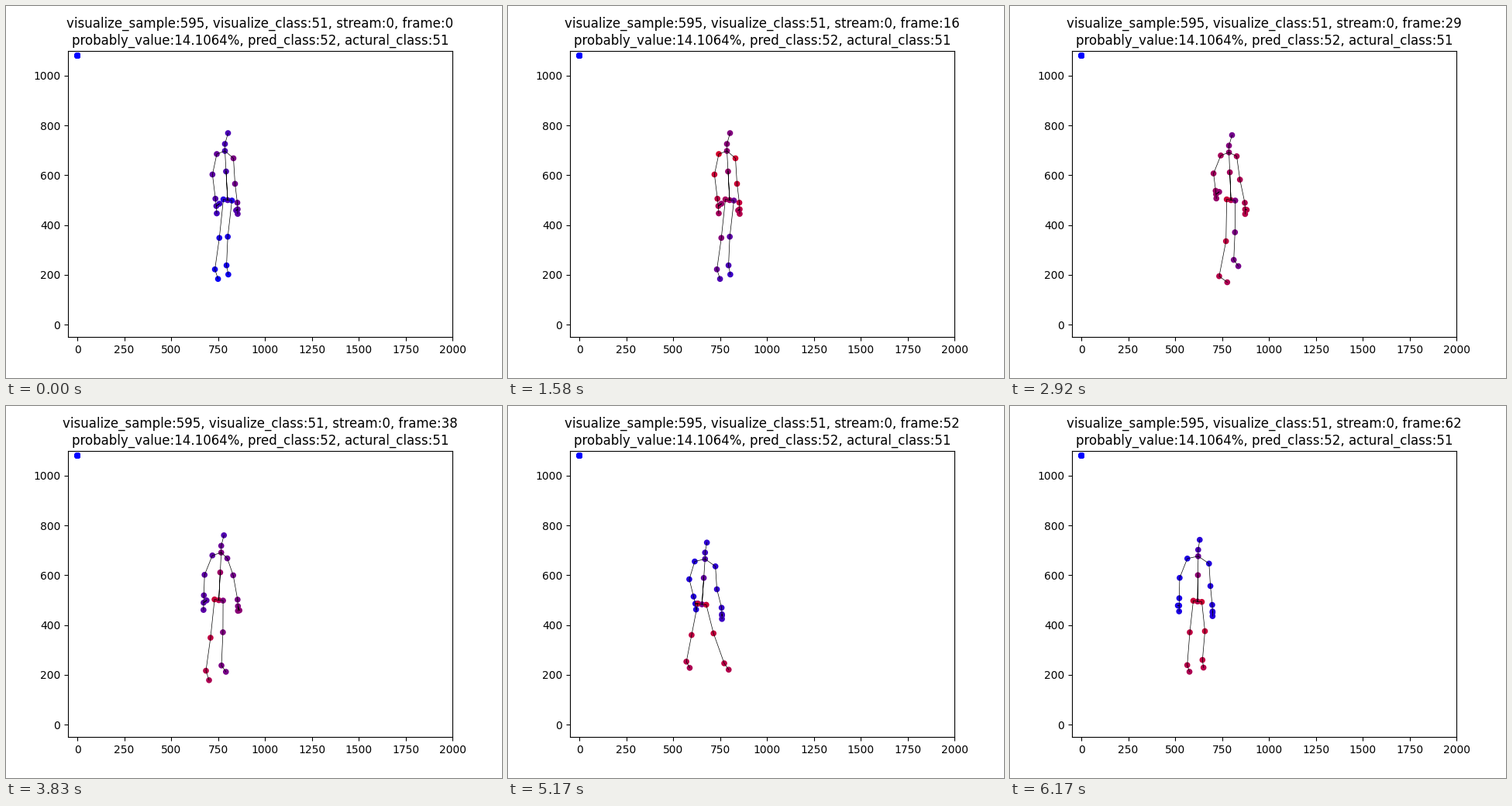
A matplotlib script for the animation above (6260 ms loop, 640 px wide and 480 px high).

```python
import numpy as np
import matplotlib.pyplot as plt
from matplotlib.animation import FuncAnimation

LOOP_MS, TICK_MS = 6260, 20

# Joint indices of each drawn polyline.
LINES = [
    [0, 1, 2, 3, 4, 3],
    [2, 5, 6, 7, 8, 10, 8, 9],
    [2, 11, 12, 13, 14, 16, 14, 15],
    [4, 17, 18, 19, 20],
    [4, 21, 22, 23, 24],
]


def ease(k, start, end):
    u = np.clip((k - start) / (end - start), 0, 1)
    return u * u * (3 - 2 * u)


def bump(k, centre, width):
    return np.exp(-((k - centre) / width) ** 2)


def chain(root, *bones):
    """Joints from root along (angle, length) bones; 0 degrees hangs down."""
    angle, length = np.array(bones).T
    turn = np.radians(angle)
    steps = np.column_stack([np.sin(turn), np.cos(turn)]) * length[:, None]
    return root + np.vstack([[0, 0], np.cumsum(steps, axis=0)])


def pose(k):
    """Screen positions: stand, raise one arm, then stride to the left."""
    ready, lift, sway = ease(k, 20, 29), bump(k, 29, 4), bump(k, 37, 7)
    walk, step, stride = ease(k, 26, 62), ease(k, 36, 54), bump(k, 52, 6)

    pelvis = np.array([286 - 44 * walk, 250.5 + 1.5 * step + 4 * stride])
    lean = -3.5 + 4 * walk + 8 * bump(k, 44, 10)
    height = np.array([86.5, 72.5, 63.5, 37, 0])
    spine = pelvis + np.column_stack([
        lean * np.minimum(height / 63.5, 1),
        -height * (1 - 0.03 * ready - 0.05 * step)])
    spine[0, 0] += 4 - 2 * walk
    chest = spine[2]

    fore = 7 - 9 * ease(k, 29, 38) + 16 * stride
    arm_a = chain(chest + [-10.5 - 3.5 * walk, 4 - walk],
                  (-12 - 10 * ready + 5 * stride, 27 - 2 * lift - 3 * stride),
                  (fore, 31.5 - 5 * ready - 4 * lift - 3.5 * stride),
                  (fore, 9.5 - 5 * lift),
                  (fore / 2, 9.5 - 4 * lift - 2 * step))
    thumb_a = arm_a[3] + [4 - 6 * step + 5 * stride, 3 * step - 3]

    arm_b = chain(chest + [11 + 3 * walk - 4 * sway, 9.5 - 2 * sway - 4 * lift],
                  (3.5 + 16 * sway, 33 - 9 * sway - 4 * walk),
                  (7 + 5 * ready - 7 * walk + 8 * stride, 24.5 + 7.5 * sway + 4 * lift),
                  (3, 8.5),
                  (0, 6))
    thumb_b = arm_b[3] + [-2 + 4 * ready - 2 * step, 1.5 + 4 * sway - 2 * lift]

    leg_a = chain(pelvis + [-5.5, -1],
                  (-6 + 5 * lift - 5 * stride, 50 + 4 * lift - 9 * step),
                  (-8 - 3 * lift - 7 * stride + 4 * step,
                   41 + 2 * ready + 3 * lift - 8 * stride),
                  (18 + 35 * lift + 10 * stride, 13 - 4 * step))
    leg_b = chain(pelvis + [5.5, 0.5],
                  (-6.5 + 6 * ready + 6 * step + 9 * stride, 47 - 6 * ready - 3 * step),
                  (-2.5 - 4 * step + 26 * stride, 37 + 6 * sway - 3 * lift + 4 * stride),
                  (11 + 25 * ready - 30 * step + 28 * stride, 12 - 2 * ready))
    return np.vstack([spine, arm_a, thumb_a, arm_b, thumb_b, leg_a, leg_b])


def heats(k):
    """Joint heat, 0 blue to 1 red, blended from root to tip of each limb."""
    warm, late, step = ease(k, 0, 23), ease(k, 8, 26), ease(k, 36, 54)
    limbs = [
        (0.15 + 0.37 * bump(k, 20, 20), 0.3 + 0.4 * warm - 0.25 * bump(k, 52, 6), 5),
        (0.1 + 0.75 * bump(k, 18.5, 19), 0.1 + 0.55 * bump(k, 22, 18), 6),
        (0.12 + 0.7 * bump(k, 18, 22), 0.1 + 0.65 * bump(k, 24, 23), 6),
        (0.14 + 0.64 * warm, 0.03 + 0.65 * late, 4),
        (0.12 + 0.38 * warm + 0.3 * step, 0.06 + 0.4 * late + 0.25 * step, 4),
    ]
    return np.concatenate([np.linspace(*limb) for limb in limbs])


def to_data(points):
    """Screen pixels to axes units."""
    x = (points[:, 0] - 80) / 496 * 2050 - 50
    y = 1100 - (points[:, 1] - 57.6) / 369.6 * 1150
    return np.column_stack([x, y])


def step_at(ms):
    """Twelve ticks a second, with every sixth one held."""
    n = int((ms + 5) * 12 / 1000)
    return n - (n + 3) // 6


fig, ax = plt.subplots(figsize=(6.4, 4.8), dpi=100)
ax.set_xlim(-50, 2000)
ax.set_ylim(-50, 1100)
title = ax.set_title("")

# The second, missing body collapses onto one point.
EMPTY = np.tile([0, 1080], (25, 1))
dots = ax.scatter(*np.vstack([EMPTY, EMPTY]).T, s=16, linewidths=1.5)
bones = [ax.plot([], [], color="black", lw=0.5)[0] for _ in LINES]


def draw(i):
    k = step_at(i * TICK_MS + TICK_MS / 2)
    joints = to_data(pose(k))
    red = np.concatenate([heats(k), np.zeros(25)])
    dots.set_offsets(np.vstack([joints, EMPTY]))
    dots.set_color(np.column_stack([red, 0 * red, 1 - red]))
    for bone, line in zip(bones, LINES):
        bone.set_data(*joints[line].T)
    title.set_text(f"visualize_sample:595, visualize_class:51, stream:0, frame:{k}\n"
                   "probably_value:14.1064%, pred_class:52, actural_class:51")
    return [dots, title, *bones]


anim = FuncAnimation(fig, draw, frames=LOOP_MS // TICK_MS, interval=TICK_MS,
                     repeat=True, repeat_delay=0)
plt.show()
```
